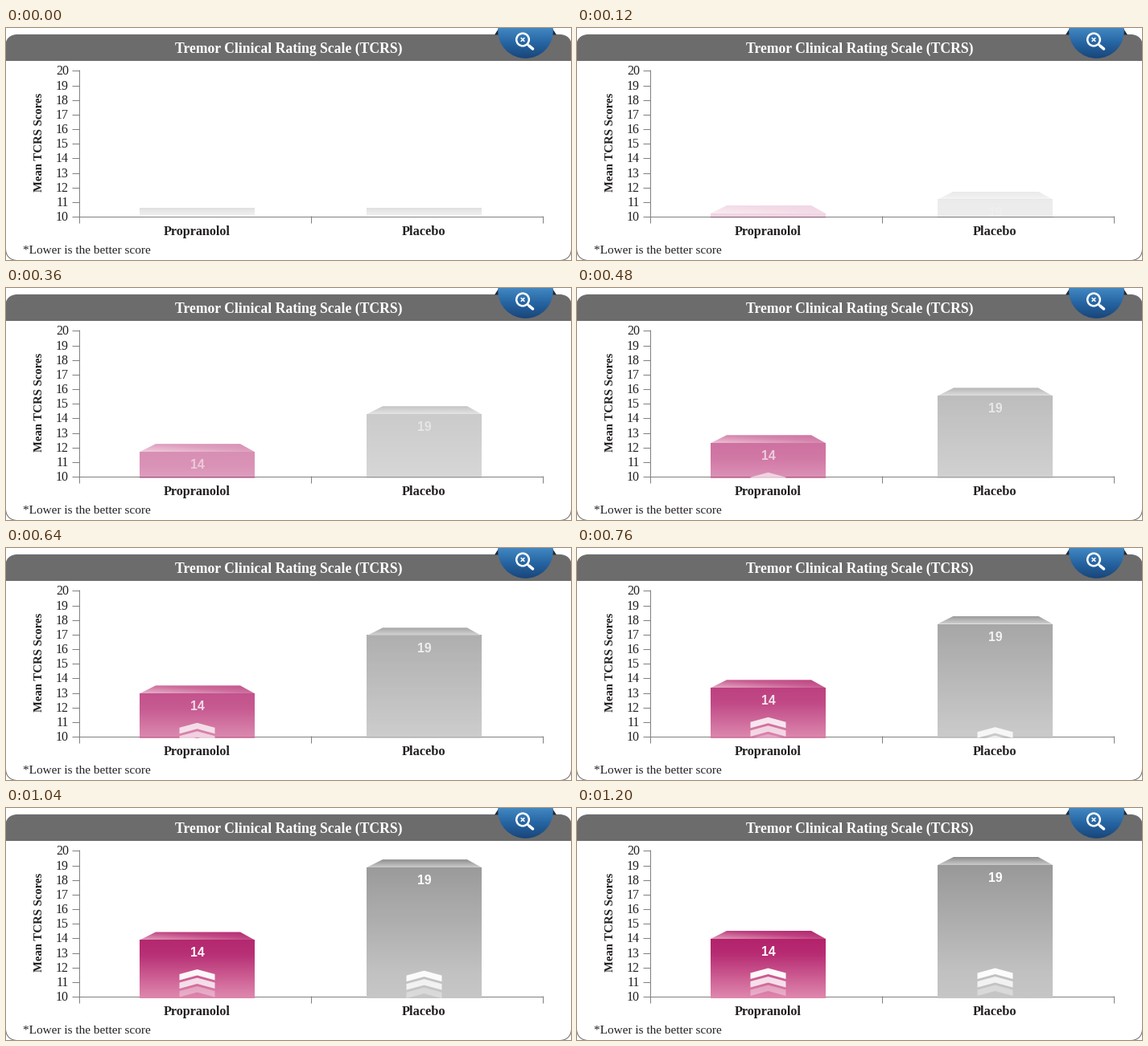
These frames come from a looping animation (702 px wide and 289 px high, 8000 ms). A matplotlib script:

```python
import numpy as np
import matplotlib.pyplot as plt
from matplotlib.animation import FuncAnimation
from matplotlib.colors import to_rgb
from matplotlib.patches import Circle, FancyBboxPatch, Polygon, Rectangle

W, H, DPI = 702, 289, 64
PX = 72 / DPI            # points per pixel
FRAMES, STEP = 200, 40
RISE = 30                # frames until the bars stand still
FLOOR = 237              # y of the floor that hides the rising bars
SERIF, SANS = "Liberation Serif", "Liberation Sans"
GREY = "#6c6c6c"
AXIS = "#808080"

fig = plt.figure(figsize=(W / DPI, H / DPI), dpi=DPI, facecolor="white")
ax = fig.add_axes([0, 0, 1, 1])
ax.axis("off")


def label(x, y, text, size, color="#231f20", weight="bold", font=SERIF, **kw):
    kw = {"ha": "center", "va": "baseline", "zorder": 6, **kw}
    return ax.text(x, y, text, fontsize=size * PX, color=color,
                   weight=weight, family=font, **kw)


def line(xs, ys, color=AXIS, width=1, z=1, cap="butt"):
    ax.plot(xs, ys, color=color, lw=width * PX, zorder=z, solid_capstyle=cap)


def mix(stops, t):
    """Colours at t along (position, colour) stops."""
    pos = [p for p, _ in stops]
    rgb = np.array([to_rgb(c) for _, c in stops])
    return np.stack([np.interp(t, pos, rgb[:, k]) for k in range(3)], axis=-1)


def gradient(box, stops, slant=0.0, z=2):
    """Paint a gradient in box (left, right, top, bottom); slant turns it sideways."""
    left, right, top, bottom = box
    v, u = np.mgrid[0:1:64j, 0:1:64j]
    return ax.imshow(mix(stops, (1 - slant) * v + slant * (1 - u)),
                     extent=(left, right, bottom, top), aspect="auto",
                     interpolation="bilinear", zorder=z)


class Bar:
    """A box with a bevelled top, a number and three chevrons."""

    def __init__(self, left, right, top, text, front, lid, slant):
        self.left, self.right, self.top = left, right, top
        self.mid = (left + right) / 2
        self.front = gradient((left, right, top + 10, FLOOR), front)
        self.lid = gradient((left, right, top, top + 10), lid, slant)
        self.edge = Polygon(self.lid_points(0), transform=ax.transData)
        self.text = label(self.mid, 0, text, 15.8, "white", font=SANS, zorder=3)
        self.marks = [ax.add_patch(Polygon([(0, 0)] * 3, fc="white", lw=0, zorder=3))
                      for _ in range(3)]

    def lid_points(self, dy):
        y = self.top + dy
        return [(self.left, y + 10), (self.left + 20, y),
                (self.right - 18, y), (self.right, y + 10)]

    def place(self, p):
        dy = (FLOOR - self.top) * (1 - p) ** 2
        fade = 1 - (1 - p) ** 2
        y = self.top + dy
        self.front.set_extent((self.left, self.right, FLOOR + dy, y + 10))
        self.lid.set_extent((self.left, self.right, y + 10, y))
        self.edge.set_xy(self.lid_points(dy))
        self.lid.set_clip_path(self.edge)
        self.front.set_alpha(fade)
        self.lid.set_alpha(fade)
        self.text.set_position((self.mid, y + 31))
        self.text.set_alpha(fade)
        for k, (mark, strength) in enumerate(zip(self.marks, (0.97, 0.8, 0.36))):
            tip = 199.5 + 10.5 * k + dy
            mark.set_xy([(self.mid + 22 * s, tip + d) for s, d in
                         ((-1, 6), (0, 0), (1, 6), (1, 13.5), (0, 7.5), (-1, 13.5))])
            mark.set_alpha(strength * fade)


def panel(**kw):
    return ax.add_patch(FancyBboxPatch(
        (-0.6, 8.4), W + 1.2, H - 7.8, boxstyle="round,pad=0,rounding_size=16", **kw))


# Panel, header and title
header = panel(fc=GREY, ec="none", zorder=5)
header.set_clip_path(Rectangle((0, 8), W, 33, transform=ax.transData))
panel(fc="none", ec=GREY, lw=PX, zorder=5)
label(351.3, 30.5, "Tremor Clinical Rating Scale (TCRS)", 17.6, "white")

# Corner badge: dark folds, round tab and magnifier
for s in (-1, 1):
    ax.add_patch(Polygon([(645.5 + s * 33, 0), (645.5 + s * 38.5, 8.5), (645.5 + s * 33, 8.5)],
                         fc="#1d2a3a", lw=0, zorder=6))
badge = gradient((610, 681, -1, 38), [(0, "#4389c3"), (0.5, "#2665a3"), (1, "#194579")], z=6.5)
badge.set_clip_path(Circle((645.5, 3.5), 34.3, transform=ax.transData))
ax.add_patch(Circle((642, 14.5), 7.8, fc="none", ec="white", lw=2.5 * PX, zorder=7))
line([647.5, 650], [20, 22.5], "white", 2.4, 7)
line([650, 654.5], [22.2, 26], "white", 3.6, 7, "round")
for s in (-1, 1):
    line([639.7, 644.3], [14.5 - 2.3 * s, 14.5 + 2.3 * s], "white", 1.6, 7)

# Axes
line([90.5, 90.5], [52, 243])
line([90, 667], [234.5, 234.5])
for x in (378.5, 666.5):
    line([x, x], [234, 243])
for n in range(10, 21):
    y = round(234 - 18.15 * (n - 10)) + 0.5
    line([82, 91], [y, y])
    label(78, y + 5.2, str(n), 16, weight="normal", ha="right")
label(41.5, 142.2, "Mean TCRS Scores", 14.8, rotation=90, va="center")
label(237.5, 258, "Propranolol", 16.1)
label(519, 258, "Placebo", 16.4)
label(21.3, 280.7, "*Lower is the better score", 15.3, weight="normal", ha="left")

# Bars, and the floor they rise from
bars = [
    Bar(166, 309, 153, "14",
        [(0, "#b3236c"), (0.25, "#b72c73"), (1, "#df88ae")],
        [(0, "#b3236c"), (0.45, "#bf4381"), (1, "#e29bbb")], 0.5),
    Bar(448, 591, 61, "19",
        [(0, "#999999"), (0.8, "#c1c1c1"), (1, "#c6c6c6")],
        [(0, "#8c8c8c"), (1, "#cacaca")], 0.0),
]
strips = [gradient((b.left, b.right, 224, 234), [(0, "#e0e0e0"), (1, "#f2f2f2")])
          for b in bars]
for bar in bars:
    ax.add_patch(Rectangle((bar.left - 5, FLOOR), 153, H - FLOOR,
                           fc="white", lw=0, zorder=4))

ax.set_xlim(0, W)
ax.set_ylim(H, 0)


def update(i):
    for bar, strip in zip(bars, strips):
        bar.place(min(i / RISE, 1))
        strip.set_visible(i == 0)
    return []


anim = FuncAnimation(fig, update, frames=FRAMES, interval=STEP,
                     init_func=lambda: update(0), repeat=True, repeat_delay=0)
plt.show()
```
